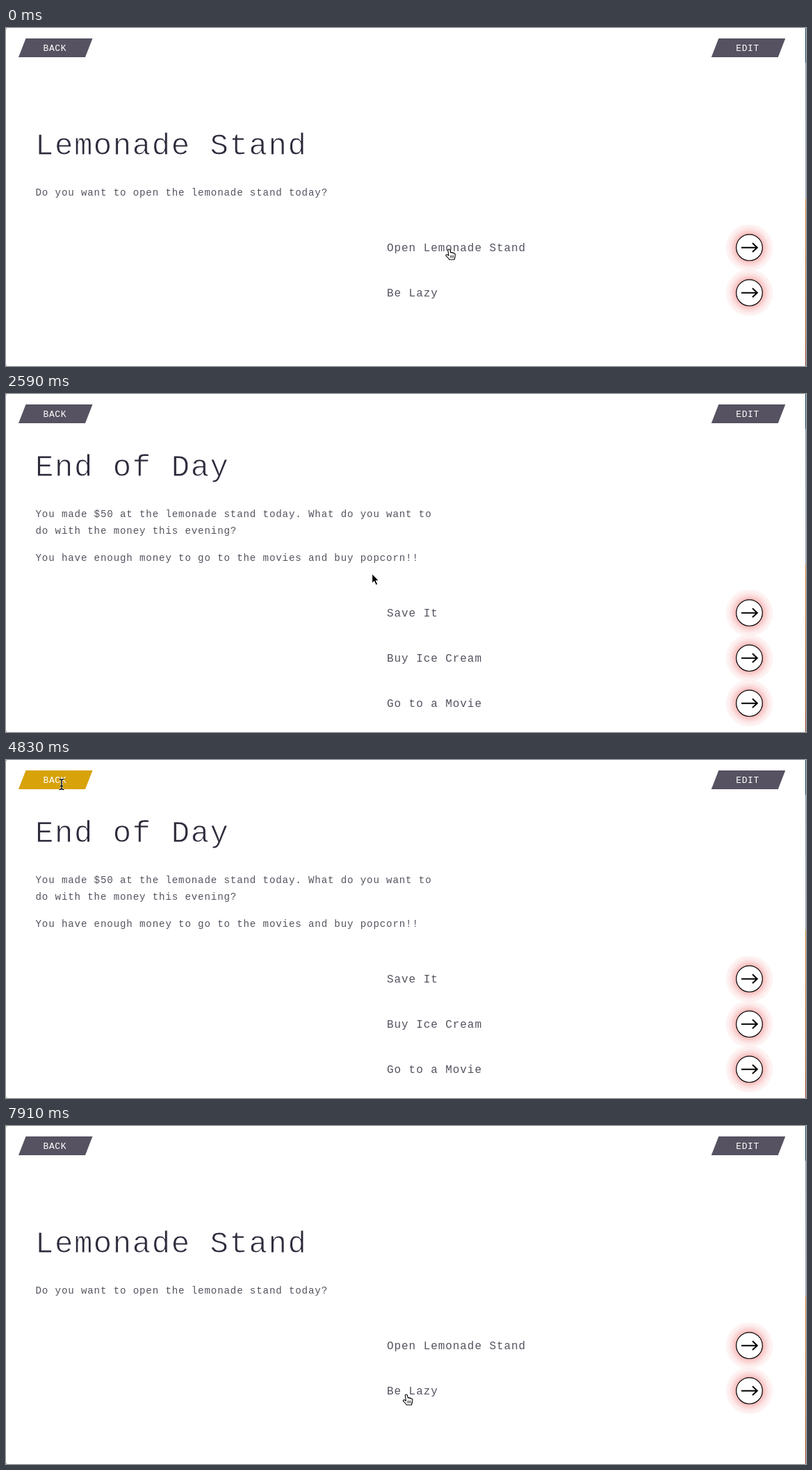
An HTML page that plays this animation: 1151x486 px, repeating every 8000 ms.

```html
<!DOCTYPE html>
<html lang="en">
<head>
<meta charset="utf-8">
<title>Lemonade Stand</title>
<style>
html, body { margin: 0; width: 100%; height: 100%; overflow: hidden; background: #fff; }
svg { display: block; width: 100%; height: 100%; }
text { font-family: "Courier New", "Liberation Mono", monospace; white-space: pre; }
</style>
</head>
<body>
<svg id="stage" viewBox="0 0 1151 486">
  <defs>
    <radialGradient id="glow" gradientUnits="userSpaceOnUse" cx="0" cy="0" r="34">
      <stop offset=".55" stop-color="#ee5a5a" stop-opacity=".44"/>
      <stop offset=".7" stop-color="#ee5a5a" stop-opacity=".25"/>
      <stop offset=".85" stop-color="#ee5a5a" stop-opacity=".11"/>
      <stop offset="1" stop-color="#ee5a5a" stop-opacity=".05"/>
    </radialGradient>
    <linearGradient id="edge" x1="0" y1="0" x2="0" y2="1">
      <stop offset=".103" stop-color="#1d4a6c"/>
      <stop offset=".104" stop-color="#8298b0"/>
      <stop offset=".503" stop-color="#93a3b4"/>
      <stop offset=".504" stop-color="#c98a3c"/>
      <stop offset=".8" stop-color="#b9692f"/>
      <stop offset="1" stop-color="#94452c"/>
    </linearGradient>
    <clipPath id="row"><rect x="-35" y="-33" width="70" height="66"/></clipPath>
    <g id="go">
      <circle r="34" fill="url(#glow)" clip-path="url(#row)"/>
      <circle r="18.8" fill="#fff" stroke="#000" stroke-width="1.2"/>
      <path d="M-11.5 0H11.5M4.5 -6.4L11.3 0L4.5 6.4" fill="none" stroke="#000" stroke-width="2"/>
    </g>
  </defs>
  <rect width="1151" height="486" fill="#fff"/>
  <g id="scenes"></g>
  <g id="nav"></g>
  <rect x="1150" width="1" height="486" fill="url(#edge)"/>
  <path d="M0 0h1v1H0zM0 485h1v1H0z" fill="#777"/>
  <g id="cursor">
    <g id="hand" stroke="#000" stroke-width="1.1" stroke-linejoin="round">
      <path fill="#fff" d="M-1.7 1Q-.2 -1 1.3 1L2.4 5Q3.6 4.1 4.6 5.4Q6 4.6 6.9 6.1Q8.8 5.8 8.8 8Q8.8 11.5 7.4 15H.2Q-1 12.3 -4.5 9.6Q-5 7.2 -2.3 8L-.6 9.2Z"/>
      <path fill="none" stroke-width=".8" d="M2 8.8V12.6M4 8.8V12.6M6 8.8V12.6"/>
    </g>
    <path id="arrow" stroke="#fff" d="M0 1.5V15L3.1 12.2L5.5 17.7L8 16.6L5.6 11.3H9.6Z"/>
    <g id="beam" fill="none">
      <path stroke="#fff" stroke-width="2.8" d="M-3.5 -7.5Q0 -7.5 0 -5.5Q0 -7.5 3.5 -7.5M0 -6V6M-3.5 7.5Q0 7.5 0 5.5Q0 7.5 3.5 7.5M-2 2.5H2"/>
      <path stroke="#000" stroke-width="1.4" d="M-3.5 -7.5Q0 -7.5 0 -5.5Q0 -7.5 3.5 -7.5M0 -6V6M-3.5 7.5Q0 7.5 0 5.5Q0 7.5 3.5 7.5M-2 2.5H2"/>
    </g>
  </g>
</svg>
<script>
const LOOP = 8000, STEP = 70, LAST = 7910;
const GREY = '#565261', GOLD = '#d7a20a';
const $ = id => document.getElementById(id);

// Text with a fixed advance per character
function label(str, x, y, size, advance, fill, thin = 0) {
  const gap = (advance - size * 0.6).toFixed(3);
  const stroke = thin ? ` stroke="#fff" stroke-width="${thin}"` : '';
  return `<text x="${x}" y="${y}" font-size="${size}" letter-spacing="${gap}" fill="${fill}"${stroke}>${str}</text>`;
}

const title = (s, y) => label(s, 42, y, 44, 27.95, '#2d2b3c', 0.9);
const para = (s, y) => label(s, 42.5, y, 14.2, 9.35, '#55535f');
const option = (s, y) =>
  label(s, 548, y + 5.2, 16, 10.53, '#55535f') + `<use href="#go" x="1069.5" y="${y}"/>`;

// Zones are [left, top, right, bottom]
const scenes = [
  {
    art: title('Lemonade Stand', 182.3) +
      para('Do you want to open the lemonade stand today?', 241) +
      option('Open Lemonade Stand', 315.7) + option('Be Lazy', 380.7),
    rows: [315.7, 380.7],
    text: [[43, 145, 432, 195], [43, 224, 613, 250]]
  },
  {
    art: title('End of Day', 118.3) +
      para('You made $50 at the lemonade stand today. What do you want to', 176.5) +
      para('do with the money this evening?', 200.5) +
      para('You have enough money to go to the movies and buy popcorn!!', 240) +
      option('Save It', 314.7) + option('Buy Ice Cream', 379.7) + option('Go to a Movie', 444.7),
    rows: [314.7, 379.7, 444.7],
    text: [[43, 80, 320, 130], [43, 160, 613, 248]]
  }
];

const button = (id, s, x) =>
  `<path id="${id}" d="M${x + 10.5} 15h96l-10.5 27h-96z" fill="${GREY}"/>` +
  label(s, x + 35.5, 33, 13, 8.4, '#fff');

$('scenes').innerHTML = scenes.map((s, i) => `<g id="scene${i}">${s.art}</g>`).join('');
$('nav').innerHTML = button('back', 'BACK', 18) + button('edit', 'EDIT', 1014.8);

// Pointer hotspot: time, x, y
const path = [
  [0, 637.5, 318], [2240, 637.5, 318], [2450, 585, 288], [2870, 410, 195],
  [3220, 311, 142], [3920, 160, 80], [4480, 110, 52], [4830, 80, 35], [5880, 80, 35],
  [6090, 93, 42], [6300, 180, 97], [6510, 305, 178], [6720, 407, 244],
  [7000, 497, 318], [7280, 540, 364], [7560, 560, 383], [7770, 575, 386], [7910, 576, 386]
];

function pointer(t) {
  const i = path.findIndex(p => p[0] > t);
  if (i < 0) return path[path.length - 1].slice(1);
  const [a, ax, ay] = path[i - 1], [b, bx, by] = path[i];
  const k = (t - a) / (b - a);
  return [ax + (bx - ax) * k, ay + (by - ay) * k];
}

const within = (x, y, [l, t, r, b]) => x >= l && x <= r && y >= t && y <= b;

function shape(x, y, scene) {
  if (scene.rows.some(r => within(x, y, [548, r - 22, 1103, r + 22]))) return 'hand';
  const zones = [[50, 18, 90, 40], ...scene.text];
  return zones.some(z => within(x, y, z)) ? 'beam' : 'arrow';
}

function show(id, on) { $(id).style.display = on ? '' : 'none'; }

function render(ms) {
  const t = Math.min(LAST, Math.floor((ms % LOOP) / STEP) * STEP);
  const current = t >= 630 && t < 5670 ? 1 : 0;
  const [x, y] = pointer(t);
  const kind = shape(x, y, scenes[current]);
  scenes.forEach((s, i) => show('scene' + i, i === current));
  ['hand', 'arrow', 'beam'].forEach(k => show(k, k === kind));
  $('back').setAttribute('fill', within(x, y, [18, 15, 124, 43]) ? GOLD : GREY);
  $('cursor').setAttribute('transform', `translate(${x.toFixed(1)} ${y.toFixed(1)})`);
}

const start = performance.now();
function tick() {
  render(performance.now() - start);
  requestAnimationFrame(tick);
}
tick();
</script>
</body>
</html>
```
